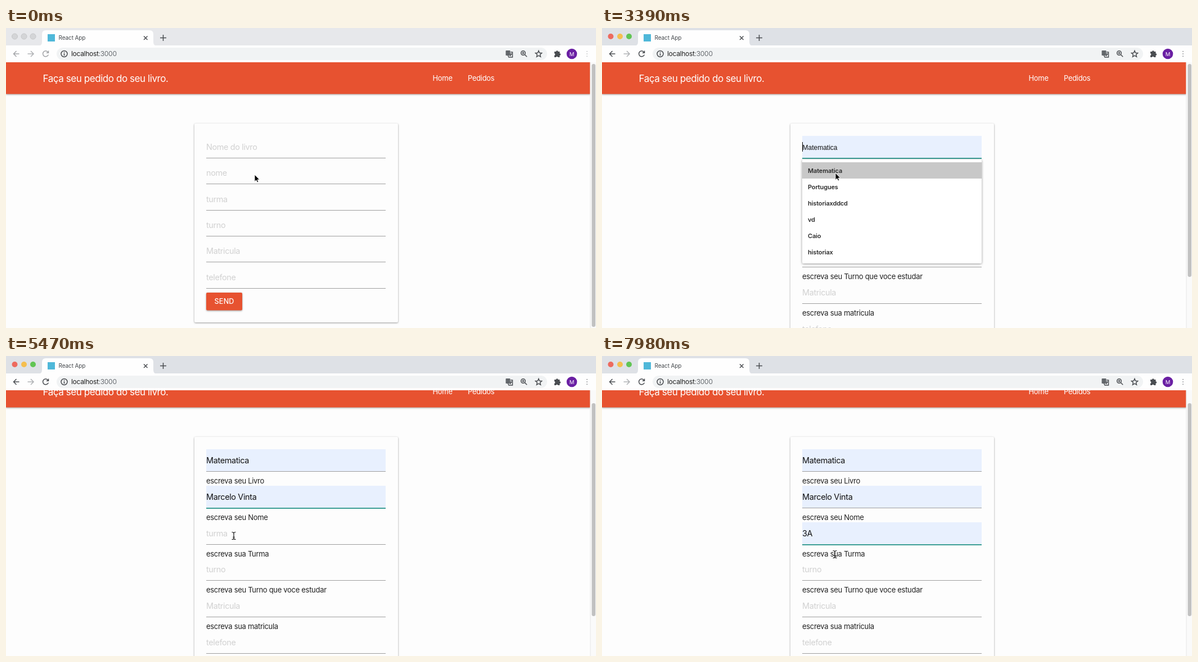
An HTML page for the animation above (8 s loop, 1049x534 px).

```html
<!DOCTYPE html>
<html lang="pt">
<head>
<meta charset="utf-8">
<title>React App</title>
<style>
html, body { margin: 0; width: 100%; height: 100%; overflow: hidden; background: #fdfdfd; }
svg { display: block; width: 1049px; height: 534px; }
text { font: 13px Inter, sans-serif; letter-spacing: -.0235em; fill: #212121; white-space: pre; }
.brand { font-size: 17px; letter-spacing: -.43px; fill: #fff; }
.nav { fill: #fff; }
.send { font-size: 12.6px; letter-spacing: .2px; font-weight: 500; fill: #fff; }
.hint { font-size: 14.4px; fill: #d1d1d1; }
.value { font-size: 14.4px; fill: #111; }
.preview { font: 12px "Liberation Sans", Arial, sans-serif; letter-spacing: 0; fill: #111; }
.item { font-size: 11px; font-weight: 600; letter-spacing: -.15px; fill: #2b2b2b; }
.tab { font-size: 10px; letter-spacing: -.1px; fill: #45494d; }
.url { font-size: 12px; letter-spacing: -.3px; }
.letter { font-size: 9.5px; fill: #fff; text-anchor: middle; }
.bar { filter: drop-shadow(0 1px 1.5px rgba(0,0,0,.35)); }
.card { filter: drop-shadow(0 1px 1.5px rgba(0,0,0,.4)); }
.menu { filter: drop-shadow(0 1px 2px rgba(0,0,0,.4)); }
.icon { fill: none; stroke: #4a4d51; stroke-width: 1.5; }
.strip { fill: #dee1e6; }
.live { stroke: #4a4d51; }
.off .strip { fill: #e7e8eb; }
.off .live { stroke: #a3a5a8; }
.off .light { fill: #d4d5d7; stroke: #c6c7c9; }
</style>
</head>
<body>
<svg id="stage" viewBox="0 0 1049 534">
  <rect width="1049" height="534" fill="#fdfdfd"/>
  <g id="page"></g>
  <g id="chrome">
    <rect class="strip" width="1049" height="32"/>
    <rect y="31" width="1049" height="30" fill="#fefefe"/>
    <circle class="light" cx="15.5" cy="15" r="5" fill="#ed6a5e"/>
    <circle class="light" cx="32" cy="15" r="5" fill="#f5bf4f"/>
    <circle class="light" cx="48" cy="15" r="5" fill="#61c554"/>
    <path d="M57 32q7 0 7-7V11q0-7 7-7H255q7 0 7 7v14q0 7 7 7z" fill="#fefefe"/>
    <rect x="74" y="11" width="13" height="13" fill="#4fb8d9"/>
    <text class="tab" x="93.5" y="21">React App</text>
    <path class="icon" d="M245 14.5l6.5 6.5m0-6.5l-6.5 6.5"/>
    <path class="icon" d="M274 17.5h11m-5.5-5.5v11"/>
    <path class="icon live" d="M23.500 46H13.500m5-5l-5 5l5 5"/>
    <path class="icon" style="stroke:#b0b2b5" d="M38.500 46h10.500m-5-5l5 5l-5 5"/>
    <path class="icon live" d="M75 43.500A5 5 0 1 0 75.300 47.500M75.500 40.500v3.700h-3.700"/>
    <rect x="90" y="35" width="872" height="22" rx="11" fill="#f1f3f4"/>
    <circle class="icon" cx="103.500" cy="46" r="5.500" stroke-width="1.200"/>
    <path class="icon" d="M103.500 45v4.200m0-6.700v1.400"/>
    <text class="url" x="116" y="50">localhost<tspan fill="#686c70">:3000</tspan></text>
    <rect x="888.500" y="40" width="8" height="9" rx="1" fill="#63676b"/>
    <path class="icon" stroke-width="1" d="M897 43h3.500v9h-6.500l-1.500-3m4-3h3m-3.500 4l2.800-4"/>
    <circle class="icon" cx="919.500" cy="44.500" r="3.800"/>
    <path class="icon" d="M922.200 47.200l4 4M917.500 44.500h4m-2-2v4"/>
    <path class="icon" stroke-width="1.200" d="M947 40.500l1.600 3.700l4 .4l-3 2.700l.9 4l-3.500-2.100l-3.500 2.100l.9-4l-3-2.700l4-.4z"/>
    <path fill="#4a4d51" d="M975 42h3a1.800 1.800 0 0 1 3.600 0h2.900v3.200a1.800 1.800 0 0 1 0 3.600V52h-3.300a1.700 1.700 0 0 0-3.200 0h-3v-3.200a1.800 1.800 0 0 0 0-3.500z"/>
    <circle cx="1006" cy="46" r="9.300" fill="#6a1fa3"/>
    <text class="letter" x="1006" y="49.500">M</text>
    <path class="icon live" stroke-width="2.200" stroke-linecap="round" d="M1033 41.700v0m0 4.300v0m0 4.300v0"/>
  </g>
  <g id="pointer"></g>
</svg>
<script>
const LOOP = 8000, STEP = 147.6;
const ACTIVE = 8, ERRORS = 10;
const $ = id => document.getElementById(id);

const fields = [
  { hint: 'Nome do livro', error: 'escreva seu Livro', focus: 21, open: 21, hover: 23, shut: 26, blur: 29,
    items: ['Matematica', 'Portugues', 'historiaxddcd', 'vd', 'Caio', 'historiax'] },
  { hint: 'nome', error: 'escreva seu Nome', focus: 29, open: 29, hover: 31, shut: 33, blur: 44,
    items: ['Marcelo Vinta', 'Caio', 'vd', 'historiax', 'Portugues', 'vdv'] },
  { hint: 'turma', error: 'escreva sua Turma', focus: 44, open: 45, hover: 47, shut: 50, blur: 99,
    items: ['3A', '8A', 'vdv', '3Afhg', '3Af', '3Afh'] },
  { hint: 'turno', error: 'escreva seu Turno que voce estudar' },
  { hint: 'Matricula', error: 'escreva sua matricula' },
  { hint: 'telefone', error: 'escreva seu telefone' }
];

// step, x, y, shape
const path = [
  [0, 442, 261, 'arrow'], [6, 416, 486, 'arrow'], [8, 417, 486, 'hand'],
  [10, 416, 487, 'beam'], [13, 416, 487, 'beam'], [15, 415, 378, 'beam'],
  [19, 414, 219, 'beam'], [21, 414, 219, 'beam'], [22, 415, 240, 'arrow'],
  [23, 415, 258, 'arrow'], [25, 415, 258, 'arrow'], [26, 415, 260, 'beam'],
  [28, 415, 260, 'beam'], [29, 412, 274, 'beam'], [30, 410, 300, 'arrow'],
  [31, 409, 318, 'arrow'], [33, 408, 322, 'beam'], [34, 408, 322, 'beam'],
  [37, 405, 320, 'beam'], [43, 414, 321, 'beam'], [45, 414, 322, 'beam'],
  [46, 415, 342, 'arrow'], [47, 415, 357, 'arrow'], [49, 415, 357, 'arrow'],
  [50, 414, 355, 'beam'], [54, 414, 353, 'beam']
];
const scrolls = [[35, 10], [36, 22], [37, 26]];

const shapes = {
  arrow: '<path d="M0 0V12.500L2.900 9.800L4.800 14L6.800 13.100L5 9H8.800Z" fill="#000" stroke="#fff" stroke-width=".9"/>',
  beam: '<path d="M-3.500-6.500Q0-6.500 0-4.500Q0-6.500 3.500-6.500M0-5V5M-3.500 6.500Q0 6.500 0 4.500Q0 6.500 3.500 6.500M-1.800 2.500H1.800" fill="none" stroke="#111" stroke-width="1.200"/>',
  hand: '<path d="M-1 0q1.500-1.500 2.500 0v5l6 1.500q1.500.5 1 2.500l-1.500 5H0L-4 8q0-2 3 0z" fill="#fff" stroke="#000"/>'
};

const rect = (x, y, w, h, fill, more = '') =>
  `<rect x="${x}" y="${y}" width="${w}" height="${h}" fill="${fill}" ${more}/>`;
const text = (x, y, kind, words) => `<text x="${x}" y="${y}" class="${kind}">${words}</text>`;

function drawField(f, y, k) {
  const focused = k >= f.focus && k < f.blur;
  const filled = k >= f.hover;
  const preview = filled && k <= f.shut;
  let out = filled ? rect(356, y - 39, 319, 39, '#e8f0fe') : '';
  out += rect(356, y, 319, focused ? 2 : 1, focused ? '#3d9f96' : '#9e9e9e');
  out += preview ? text(356.5, y - 14.5, 'preview', f.items[0])
    : filled ? text(356, y - 14, 'value', f.items[0])
    : text(356, y - 14, 'hint', f.hint);
  if (preview) out += rect(356, y - 28, 1, 17, '#000');
  if (k >= ERRORS) out += text(356, y + 21.5, 'error', f.error);
  return out;
}

function drawMenu(f, y, k) {
  let out = rect(356, y + 3, 319, 185, '#fff', 'rx="2" class="menu"');
  if (k >= f.hover) out += rect(356, y + 8, 319, 29, '#c8c8c8');
  f.items.forEach((item, i) => out += text(366, y + 26.5 + 29 * i, 'item', item));
  return out;
}

function drawPage(k) {
  const errors = k >= ERRORS, gap = errors ? 64.8 : 46.3;
  const scroll = scrolls.reduce((s, [at, y]) => k >= at ? y : s, 0);
  const lineY = i => Math.round(231 + gap * i);
  let out = rect(0, 61, 1039, 56.5, '#e75230', 'class="bar"')
    + text(65.5, 96, 'brand', 'Faça seu pedido do seu livro.')
    + text(758.5, 94, 'nav', 'Home') + text(821, 94, 'nav', 'Pedidos')
    + rect(335, 170, 362, errors ? 465 : 354, '#fdfdfd', 'rx="2" class="card"');
  fields.forEach((f, i) => out += drawField(f, lineY(i), k));
  const sendY = lineY(5) + (errors ? 27 : 8);
  out += rect(356, sendY, 64, 31.5, '#e75230', 'rx="2" class="card"')
    + text(370.5, sendY + 20, 'send', 'SEND');
  if (k === 52) out += rect(375, lineY(2) - 28, 1, 18, '#000');
  fields.forEach((f, i) => {
    if (k >= f.open && k < f.shut) out += drawMenu(f, lineY(i), k);
  });
  return `<g transform="translate(0 ${-scroll})">${out}</g>`
    + rect(1038.5, 61, 11, 473, '#fafafa') + rect(1038.5, 61, 1, 473, '#e8e8e8')
    + rect(1041.5, 64 + scroll * .77, 6.5, errors ? 379 : 468, '#c1c1c1', 'rx="3.2"');
}

function drawPointer(k) {
  const n = path.findLastIndex(p => p[0] <= k);
  const a = path[n], b = path[n + 1] || a;
  const u = b === a ? 0 : (k - a[0]) / (b[0] - a[0]);
  const x = a[1] + (b[1] - a[1]) * u, y = a[2] + (b[2] - a[2]) * u;
  return `<g transform="translate(${x} ${y})">${shapes[a[3]]}</g>`;
}

let shown = -1;
function tick() {
  const k = Math.floor((performance.now() % LOOP + 10) / STEP);
  if (k !== shown) {
    shown = k;
    $('page').innerHTML = drawPage(k);
    $('pointer').innerHTML = drawPointer(k);
    $('chrome').classList.toggle('off', k < ACTIVE);
  }
  requestAnimationFrame(tick);
}
tick();
</script>
</body>
</html>
```
